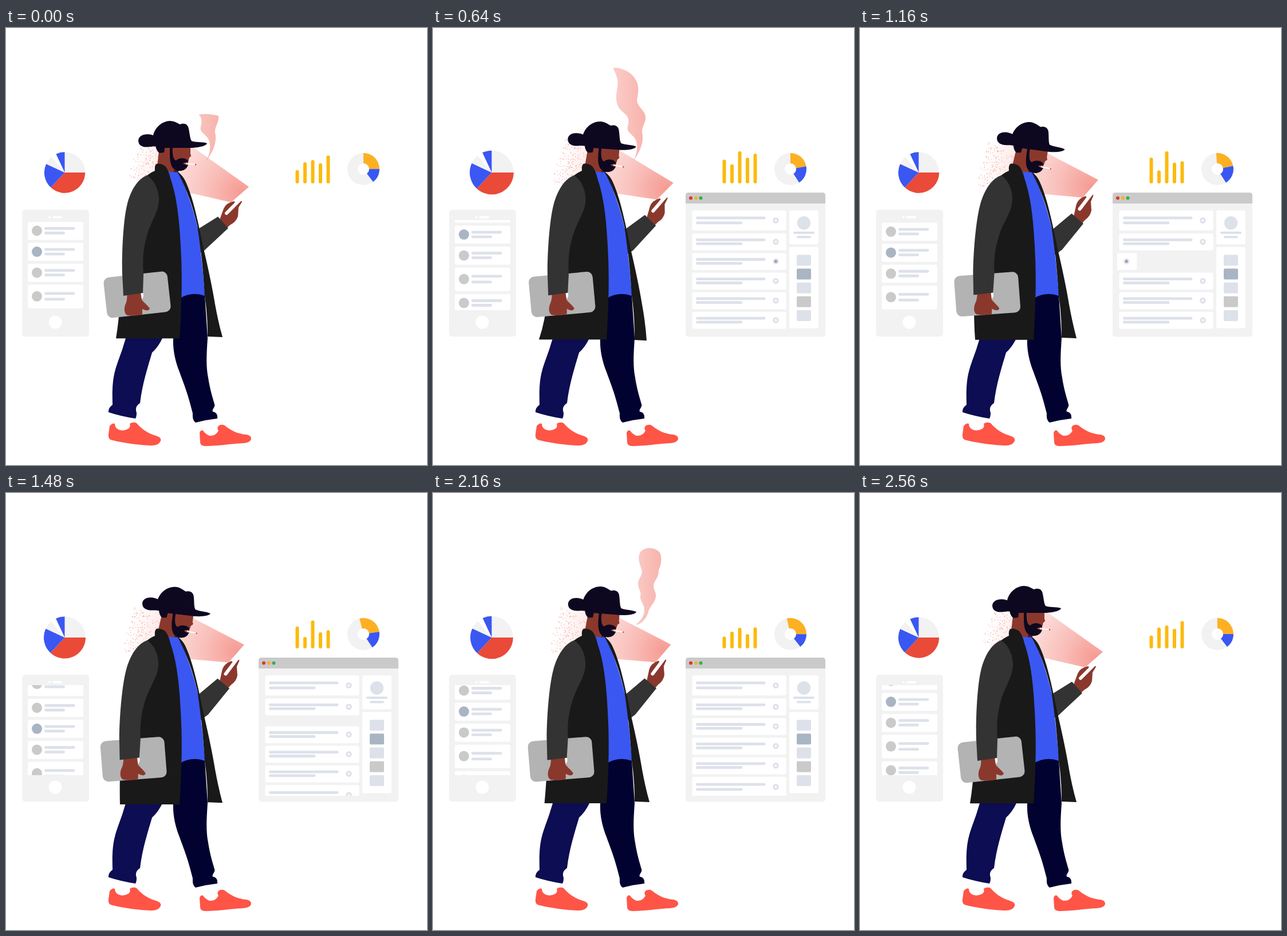
An HTML page that plays this animation: 735x762 px, repeating every 2600 ms.

```html
<!DOCTYPE html>
<html lang="en">
<head>
<meta charset="utf-8">
<title>Walking with data</title>
<style>
  html, body { margin: 0; width: 100%; height: 100%; overflow: hidden; background: #fff; }
  svg { display: block; width: 735px; height: 762px; }
</style>
</head>
<body>
<svg viewBox="0 0 735 762" xmlns="http://www.w3.org/2000/svg">
  <defs>
    <radialGradient id="glow" gradientUnits="userSpaceOnUse" cx="412" cy="288" r="190">
      <stop offset="0" stop-color="#ee4a3b" stop-opacity=".56"/>
      <stop offset=".3" stop-color="#ee4a3b" stop-opacity=".36"/>
      <stop offset=".6" stop-color="#ee4a3b" stop-opacity=".2"/>
      <stop offset="1" stop-color="#ee4a3b" stop-opacity="0"/>
    </radialGradient>
    <linearGradient id="haze" x1="0" x2="1">
      <stop offset="0" stop-color="#ee4a3b" stop-opacity=".28"/>
      <stop offset="1" stop-color="#ee4a3b" stop-opacity=".42"/>
    </linearGradient>
    <clipPath id="listClip"><rect x="38" y="335" width="97" height="157"/></clipPath>
    <clipPath id="rowClip"><rect x="449" y="310" width="168" height="218"/></clipPath>
    <clipPath id="puffClip0"><ellipse cx="348" rx="70"/></clipPath>
    <clipPath id="puffClip1"><ellipse cx="380" rx="70"/></clipPath>
  </defs>

  <g id="pie"></g>
  <g id="bars" stroke="#fbba0e" stroke-width="6" stroke-linecap="round"></g>
  <g id="donut">
    <circle cx="624" cy="246" r="28" fill="#f2f2f2"/>
    <path id="yellow" fill="#fdb022"/>
    <path id="blue" fill="#3a57f2"/>
    <circle cx="624" cy="246" r="10" fill="#fff"/>
  </g>

  <g id="phone">
    <rect x="28" y="317" width="117" height="221" rx="5" fill="#f2f2f2"/>
    <circle cx="76" cy="330" r="2" fill="#fff"/>
    <rect x="81" y="328" width="17" height="4" rx="2" fill="#fff"/>
    <circle cx="86" cy="513" r="11.5" fill="#fff"/>
    <g clip-path="url(#listClip)"><g id="list"></g></g>
  </g>

  <g id="page">
    <rect x="441" y="287" width="244" height="251.5" rx="5" fill="#f2f2f2"/>
    <path d="M441 306V292Q441 287 446 287H680Q685 287 685 292V306Z" fill="#cacaca"/>
    <circle cx="450" cy="296.5" r="3" fill="#e0352b"/>
    <circle cx="459" cy="296.5" r="3" fill="#fdb022"/>
    <circle cx="467.5" cy="296.5" r="3" fill="#34b04a"/>
    <g clip-path="url(#rowClip)"><g id="rows"></g></g>
    <g id="side"></g>
  </g>

  <g id="legs">
    <path fill="#0c0d52" d="M205 530H278L273 541Q266 556 255 566C248 590 238 620 234 654Q224 660 228 671Q228 678 226 681Q200 677 179 670Q178 663 186 657C185 620 187 605 196 580Q203 562 209 541Z"/>
    <path fill="#020230" d="M300 450H346L352 541C350 570 349 590 353 610C356 630 361 645 364 656C366 661 359 665 361 669Q370 670 369 681Q350 683 331 688Q325 684 326 672C318 640 314 630 303 600C295 580 291 560 292 541Z"/>
    <path fill="#fe5547" d="M181 694Q186 688 190 690Q190 697 196 700Q204 704 213 699Q218 696 216 690Q222 686 228 689C237 699 247 707 262 711Q272 714 270 720Q266 729 252 728C230 727 200 723 183 718Q178 716 179 708Z"/>
    <path fill="#fe5547" d="M338 706Q340 700 344 702Q348 708 355 711Q366 712 371 702Q367 697 372 693Q379 690 383 694C393 702 405 708 420 709Q429 711 428 717Q426 723 414 724C390 725 370 729 348 729Q339 729 339 722Z"/>
  </g>

  <g id="fore">
    <path fill="url(#glow)" d="M424 277L262 162A195 195 0 0 0 215 263L393 304Z"/>
    <g id="dots" fill="#ee5a4a" opacity=".75"></g>
    <path fill="#8b382c" d="M373 334L380 315Q384 305 398 302L400 304L391 316L404 304Q410 298 412 303L406 313L405 328Q402 338 392 343L386 348Z"/>
    <path stroke="#fff" stroke-width="6" stroke-linecap="round" d="M385 323L408 300"/>
    <path fill="#333" d="M325 357L370 329L388 349L345 389L325 400Z"/>
  </g>

  <g id="head">
    <path fill="#8b382c" d="M268 207H322V220Q325 223 320 226L317 238L300 246L302 262H262L266 222Z"/>
    <path fill="#4f1d18" d="M294 246L301 249L300 262L292 252Z"/>
    <path fill="#0d0820" d="M261 204H278L276 217L268 218Q262 214 261 204Z"/>
    <path fill="#0d0820" d="M286 207H291C290 220 292 230 297 231C302 226 310 226 315 229Q319 231 317 234L309 236Q313 240 318 238C316 247 308 250 300 249C291 247 287 240 286 225Z"/>
    <path fill="#c4604f" d="M309 236L316 234L316 238Z"/>
    <path stroke="#fff" stroke-width="2" d="M314 236.5L330 238"/>
    <circle cx="331" cy="238.2" r="1.2" fill="#e33528"/>
    <path fill="#0d0820" d="M231 196C232 186 245 183 257 187C260 175 270 163 286 162C294 162 299 166 304 168C311 165 318 168 319 176C321 185 321 192 324 197C333 200 342 198 351 201C350 205 340 208 325 209H278C266 207 260 206 252 207C240 209 231 206 231 196Z"/>
  </g>

  <g id="smoke" fill="url(#haze)">
    <g clip-path="url(#puffClip0)"><path d="M349 233C361 216 369 200 365 182C364 172 372 165 371 155C370 143 357 138 356 126C358 116 360 105 356 94C350 80 335 70 316 69C313 71 318 75 321 86C326 100 317 113 321 130C324 146 339 148 341 159C343 168 337 173 341 180C346 187 352 188 355 198C358 210 355 222 349 233Z"/></g>
    <g clip-path="url(#puffClip1)"><path d="M349 233C362 229 372 222 376 207C379 196 390 190 389 177C388 170 383 165 386 157C390 149 394 145 394 134C400 122 399 110 396 104C390 95 370 92 362 103C356 113 361 124 365 136C365 146 357 150 358 160C359 168 364 172 362 180C361 189 370 194 369 205C368 219 358 227 349 233Z"/></g>
  </g>

  <path fill="#3a57f2" d="M280 250L302 252C312 276 326 310 335 350C340 390 345 430 347 467Q325 459 304 471C308 420 303 350 280 250Z"/>
  <g fill="#191919"><path id="back"/><path id="front"/></g>
  <g id="arm">
    <rect x="173" y="429.5" width="112" height="71" rx="10" fill="#b3b3b3" transform="rotate(-6.3 229 465)"/>
    <ellipse cx="237" cy="466" rx="3" ry="6" fill="#fff"/>
    <path fill="#8b382c" d="M211 460H235L237 474C242 480 248 484 251 489C249 494 244 493 238 490V499Q228 503 212 501C206 498 206 490 208 483C211 477 212 470 211 460Z"/>
    <path fill="#333" d="M246 257C232 262 218 280 211 310C204 340 202 400 203 430L205 467L239 462L240 430C238 400 240 385 246 362C252 338 268 320 267 297C266 280 258 264 246 257Z"/>
  </g>
</svg>
<script>
const LOOP = 2600, STEP = 40;
const LINE = '#dde1ea', GREY = '#cacaca', SLATE = '#a9b5c3', PALE = '#f2f2f2', BLUE = '#3a57f2';
const $ = id => document.getElementById(id);
const set = (el, name, value) => el.setAttribute(name, value);

function add(parent, tag, attrs) {
  const el = document.createElementNS('http://www.w3.org/2000/svg', tag);
  for (const k in attrs) set(el, k, attrs[k]);
  return parent.appendChild(el);
}
const box = (p, x, y, width, height, fill, rx = 2) =>
  add(p, 'rect', { x, y, width, height, rx, fill });
const disc = (p, cx, cy, r, fill) => add(p, 'circle', { cx, cy, r, fill });

// Motion rules
function linear(keys, t) {
  let a = keys[0];
  for (const b of keys) {
    if (t < b[0]) return a === b ? a[1] : a[1] + (b[1] - a[1]) * (t - a[0]) / (b[0] - a[0]);
    a = b;
  }
  return a[1];
}
function ease(t, a, b) {
  const u = Math.min(1, Math.max(0, (t - a) / (b - a)));
  return u * u * (3 - 2 * u);
}
const wave = (t, mean, amp, peak, period = LOOP) =>
  mean + amp * Math.cos(2 * Math.PI * (t - peak) / period);
const sway = (t, high, late) => linear([[0, 0], [1160, high], [2160, late], [2560, 0]], t);

function wedge(cx, cy, r, a, b) {
  const at = deg => {
    const q = deg * Math.PI / 180;
    return (cx + r * Math.sin(q)) + ' ' + (cy - r * Math.cos(q));
  };
  return `M${cx} ${cy}L${at(a)}A${r} ${r} 0 ${b - a > 180 ? 1 : 0} 1 ${at(b)}Z`;
}

// Charts
let angle = 0;
for (const [end, fill] of [[90, PALE], [223, '#ea4a38'], [295, BLUE], [320, PALE], [335, '#fff'], [360, BLUE]]) {
  add($('pie'), 'path', { d: wedge(0, 0, 1, angle, end), fill });
  angle = end;
}
// Each bar: middle of its top edge, swing, time of greatest height
const bars = [[238, 13, 1000], [242, 9, 200], [224, 11, 900], [237, 11, 600], [229, 12, 400]]
  .map(([mean, swing, peak], i) => {
    const x = 508.5 + 13.5 * i;
    return { mean, swing, peak, el: add($('bars'), 'line', { x1: x, x2: x, y2: 268 }) };
  });

// A pair of text lines around a middle height
function lines(p, x, mid, gap, long, short) {
  box(p, x, mid - gap - 2.4, long, 4.8, LINE, 2.4);
  box(p, x, mid + gap - 2.4, short, 4.8, LINE, 2.4);
}

// Phone list: every fourth card is tall
for (let i = -4; i < 12; i++) {
  const k = (i + 4) % 4, tall = k === 3;
  const y = 338 + 156 * Math.floor(i / 4) + 36.6 * k, mid = y + (tall ? 20 : 15.5);
  box($('list'), 38, y, 97, tall ? 41 : 31.5, '#fff', 3);
  disc($('list'), 54, mid, 9, k === 1 ? SLATE : GREY);
  lines($('list'), 67, mid, tall ? 5 : 4, 53.5, 36);
}

// Page rows: the first and last are tall
const rows = [];
for (let i = 0; i < 7; i++) {
  const g = add($('rows'), 'g', {}), tall = i % 6 === 0;
  const y = i ? 324 + 34.2 * i : 318, mid = y + (tall ? 17.5 : 14.5);
  box(g, 452.5, y, 164, tall ? 35 : 29.6, '#fff', 3);
  lines(g, 459, mid, tall ? 4.3 : 3.4, 121.5, 81.5);
  disc(g, 598.5, mid, 5.2, LINE);
  disc(g, 598.5, mid, 2.3, i === 2 ? '#8795a8' : '#f8f8fa');
  rows.push(g);
}

// Page sidebar
const side = $('side');
box(side, 622, 318, 51, 59, '#fff', 3);
disc(side, 647.5, 340, 11.7, LINE);
box(side, 629, 355, 37, 4, LINE);
box(side, 635, 362.5, 25, 4, LINE);
box(side, 622, 382, 51, 141.5, '#fff', 3);
[LINE, SLATE, LINE, GREY, LINE].forEach((fill, i) => box(side, 635, 395.5 + 24.1 * i, 25, 19, fill));

// Sparse far end of the light beam
let seed = 7;
const rand = () => (seed = seed * 16807 % 2147483647) / 2147483647;
for (let i = 0; i < 230; i++) {
  const r = 120 + 77 * rand(), a = (188 + 24 * rand()) * Math.PI / 180;
  disc($('dots'), 410 + r * Math.cos(a), 290 + r * Math.sin(a), .6);
}

// Smoke: each puff is uncovered upwards, then thins out from below
const puffs = [
  { top: [[0, 150], [280, 100], [640, 55]], bottom: [[640, 270], [1040, 75]], fade: [680, 1040] },
  { top: [[1600, 232], [1680, 151], [2160, 90]], bottom: [[1800, 270], [2160, 234], [2480, 100]], fade: [2240, 2480] }
];

const turn = (id, deg, x, y) => set($(id), 'transform', `rotate(${deg} ${x} ${y})`);
const shift = (el, x, y) => set(el, 'transform', `translate(${x} ${y})`);

function drawMan(t) {
  turn('head', sway(t, 7.6, 4.6), 276, 255);
  turn('arm', sway(t, 2, 1.6), 248, 270);
  turn('fore', sway(t, -7.8, -8.2), 330, 330);

  const flap = linear([[0, 0], [640, 1], [1160, 0]], t);
  const backX = 192 + sway(t, 9, 2.6) - 12 * flap, backY = wave(t, 542.4, 1.4, 1000);
  const frontX = 378 - 5 * flap, frontY = 539 + 5 * flap + sway(t, 2, 0);
  set($('back'), 'd', `M260 249Q259 237 264 236.5Q272 236 278 241Q284 248 287 262C296 288 302 320 305 380
    Q308 430 306 480Q305 515 303 ${backY}H${backX}Q198 505 200 460C212 380 215 320 240 262Q252 252 260 249Z`);
  set($('front'), 'd', `M299 250Q310 258 315 271C327 298 336 340 345 385Q358 440 365 482
    Q371 515 ${frontX} ${frontY}L352 ${frontY - 1}Q352 500 347 467C344 420 340 380 334 345C326 310 315 280 299 250Z`);
}

function drawCharts(t) {
  set($('pie'), 'transform', `translate(102.5 252) scale(${wave(t, 37, 1.4, 580, LOOP / 2)})`);
  for (const b of bars) set(b.el, 'y1', 3 + wave(t, b.mean, -b.swing, b.peak));
  const from = Math.min(0, wave(t, -4, 14, 500));
  const mid = wave(t, 84.5, 6.5, 2300), to = wave(t, 145, -3, 2300);
  set($('yellow'), 'd', wedge(624, 246, 28, from, mid));
  set($('blue'), 'd', wedge(624, 246, 28, mid, to));
}

function drawScreens(t) {
  shift($('list'), 0, linear([[0, 0], [640, -30], [1760, 38], [2160, -9], [2560, -26]], t));
  set($('page'), 'visibility', t >= 120 && t < 2200 ? 'visible' : 'hidden');
  shift(rows[2], -170 * ease(t, 880, 1280), 0);
  const rise = -34.2 * ease(t, 1280, 1640);
  for (const row of rows.slice(3)) shift(row, 0, rise);
}

function drawSmoke(t) {
  puffs.forEach((p, i) => {
    const top = linear(p.top, t), bottom = Math.max(linear(p.bottom, t), top);
    const clip = $('puffClip' + i).firstElementChild;
    set(clip, 'cy', (top + bottom) / 2);
    set(clip, 'ry', (bottom - top) / 2);
    set($('smoke').children[i], 'opacity', t < p.top[0][0] ? 0 : 1 - ease(t, ...p.fade));
  });
}

const start = performance.now();
function tick() {
  const now = (performance.now() - start) % LOOP;
  const t = Math.floor(now / STEP) * STEP;
  drawMan(t);
  drawCharts(t);
  drawScreens(t);
  drawSmoke(t);
  requestAnimationFrame(tick);
}
tick();
</script>
</body>
</html>
```
